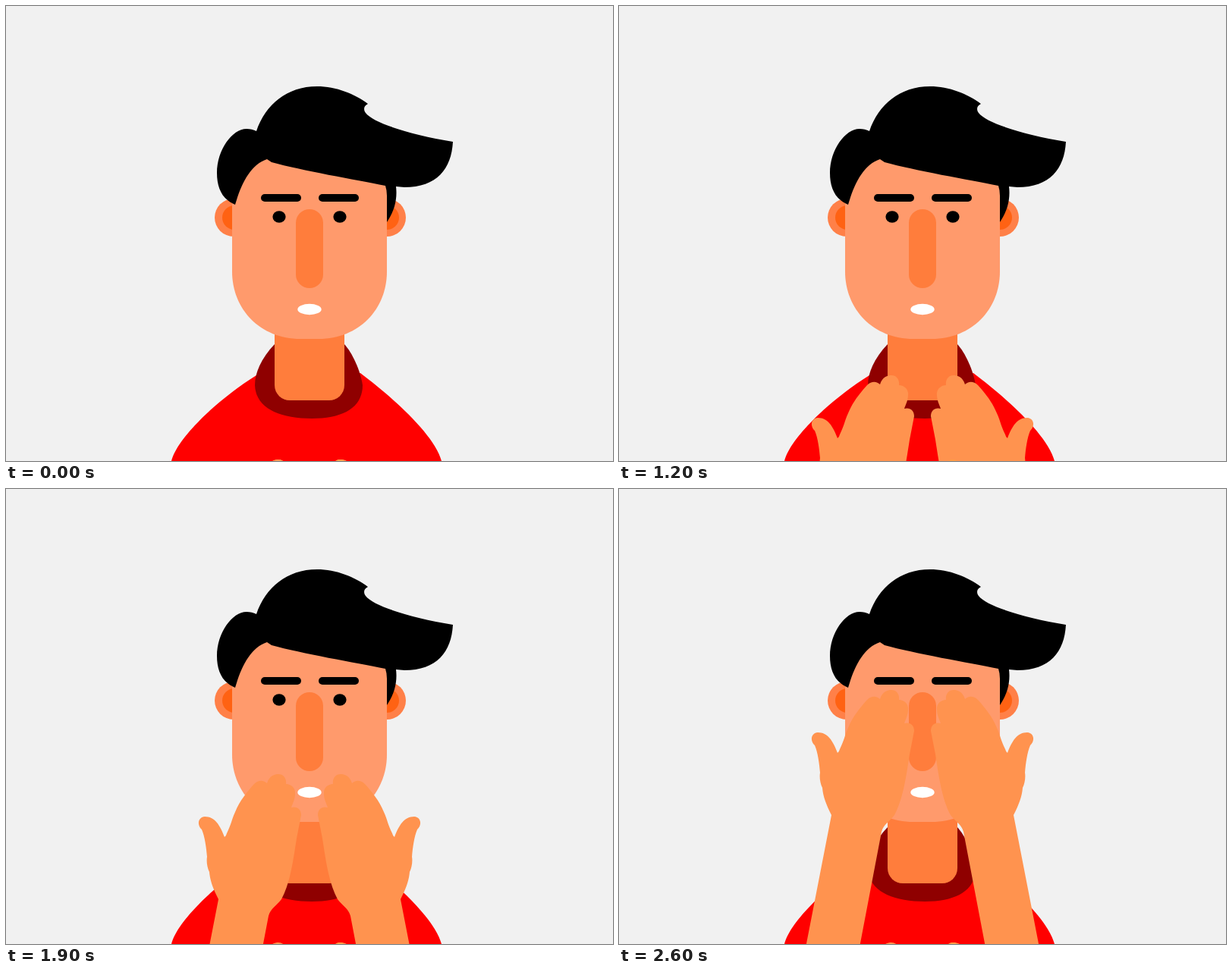
An HTML page that plays this animation: 800 px wide and 600 px high, repeating every 3000 ms.

```html
<!DOCTYPE html>
<html lang="en">
<head>
<meta charset="utf-8">
<title>Covering eyes</title>
<style>
  html, body { margin: 0; width: 100%; height: 100%; overflow: hidden; background: #f1f1f1; }
  svg { display: block; width: 100%; height: 100%; }
</style>
</head>
<body>
<svg viewBox="0 0 800 600">
  <defs>
    <path id="hand" fill="#ff934f" d="M243 620 L280 430 C273 416 269 406 268 394 C265 388 264 380 265 374
      C264 362 262 347 258 338 C252 333 252 322 262 321 C275 321 282 332 288 348 Q290 347 291 343
      C297 331 297 326 302 315 C308 300 318 288 327 278 C333 272 340 273 344 277
      C347 267 354 265 359 265 C366 265 370 271 369 278 C376 278 382 284 381 291
      C381 298 378 303 376 309 C383 307 389 311 389 319 L383 350
      C379 375 375 408 363 430 C355 440 349 442 346 452 L314 620 Z"/>
    <g id="pair">
      <use href="#hand"/>
      <use href="#hand" transform="translate(800 0) scale(-1 1)"/>
    </g>
  </defs>

  <rect width="800" height="600" fill="#f1f1f1"/>

  <!-- shirt, collar, neck -->
  <path fill="#f00" d="M218 600 C226 568 283 516 330 487 L400 500 L467 484 C512 518 565 566 574 600 Z"/>
  <path fill="#8f0000" d="M354 446 C336 465 328 484 328 500 C329 530 360 544 403 544
    C445 544 470 529 470 500 C467 480 456 457 446 446 Z"/>
  <path fill="#ff7d3c" d="M354 420 H446 V500 A20 20 0 0 1 426 520 H374 A20 20 0 0 1 354 500 Z"/>

  <!-- ears -->
  <g fill="#ff8048"><circle cx="300" cy="279" r="25"/><circle cx="502" cy="279" r="25"/></g>
  <g fill="#ff6213"><circle cx="301" cy="279" r="16"/><circle cx="502" cy="279" r="16"/></g>

  <!-- face and hair -->
  <path fill="#ff9a6c" d="M298 200 H502 V350 C502 400 465 439 412 439 H388 C335 439 298 400 298 350 Z"/>
  <path d="M302 262 C285 255 278 240 278 220 C278 190 298 162 317 162 C322 162 326 163 330 165
    C342 130 370 106 410 106 C435 106 460 116 477 129 C471 132 471 137 474 141
    C485 155 535 170 589 179 C587 215 568 239 525 239 L514 238 C516 255 512 270 502 285
    V250 Q502 243 500 237 C460 229 390 217 350 206 L344 202 C322 209 310 235 302 262 Z"/>
  <rect x="336" y="248" width="53" height="10" rx="5"/>
  <rect x="412" y="248" width="53" height="10" rx="5"/>
  <ellipse cx="360" cy="278" rx="8.6" ry="7.8"/>
  <ellipse cx="440" cy="278" rx="8.6" ry="7.8"/>
  <rect x="382" y="268" width="36" height="104" rx="18" fill="#ff7d3c"/>
  <ellipse cx="400" cy="400" rx="15.7" ry="7.2" fill="#fff"/>

  <!-- fingertips that stay at the lower edge -->
  <use href="#pair" y="333"/>
  <use id="hands" href="#pair"/>
  <ellipse cx="440" cy="602" rx="7" ry="4" fill="#ff9c45"/>
</svg>
<script>
  const LOOP = 3000, STEP = 100, START = 500, END = 2600, RISE = 333;
  const hands = document.getElementById('hands');

  function draw(ms) {
    const t = Math.floor((ms % LOOP) / STEP) * STEP;
    const p = Math.min(1, Math.max(0, (t - START) / (END - START)));
    hands.setAttribute('y', (RISE * (1 - p)).toFixed(2));
  }

  const begin = performance.now();
  function tick() {
    draw(performance.now() - begin);
    requestAnimationFrame(tick);
  }
  tick();
</script>
</body>
</html>
```
